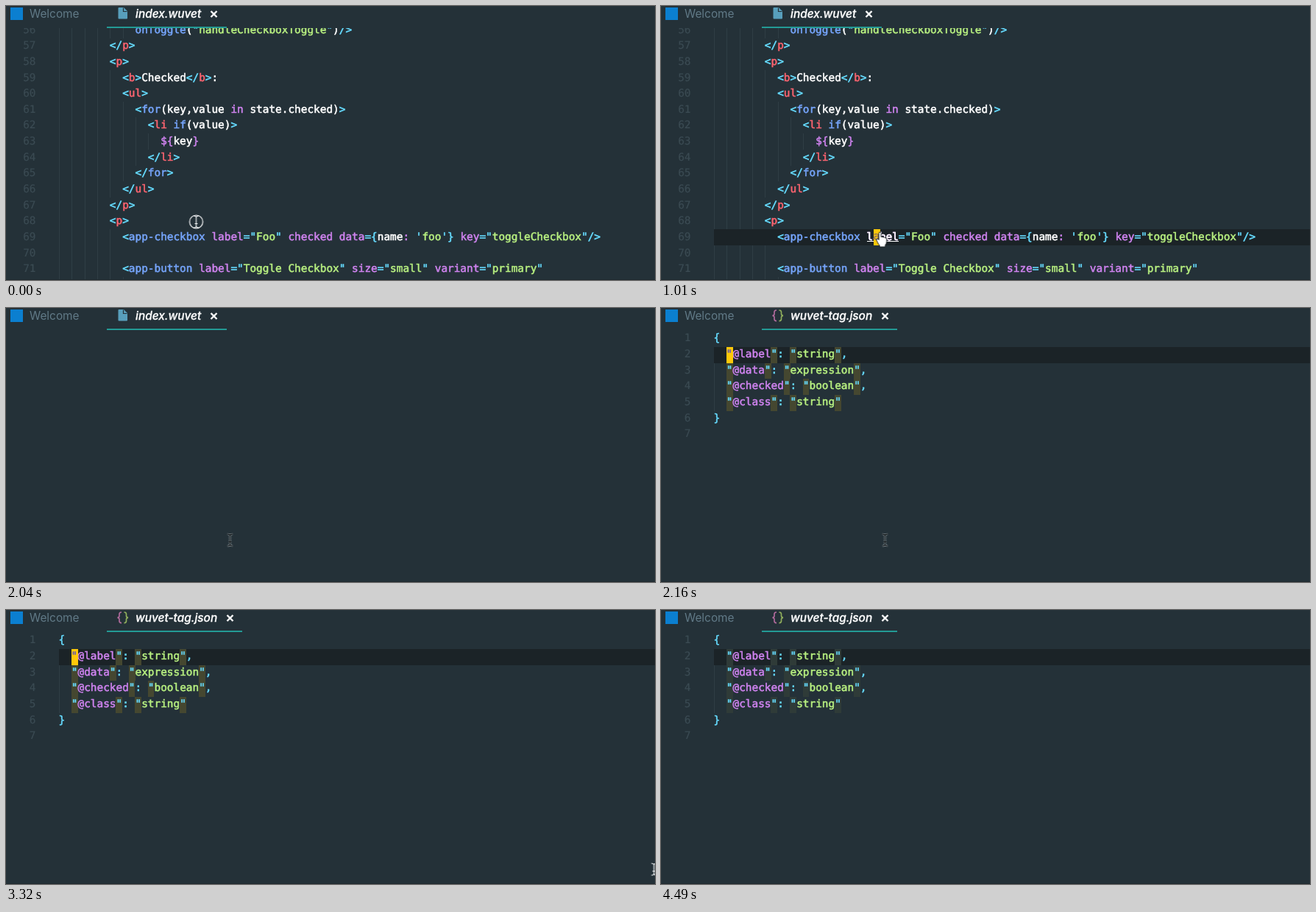
Animation of 882x372 px, one loop 4590 ms. Source, as an HTML page:

```html
<!DOCTYPE html>
<html lang="en">
<head>
<meta charset="utf-8">
<title>Editor</title>
<style>
  html, body { margin: 0; width: 100%; height: 100%; overflow: hidden; background: #243138; }
  #stage { position: relative; width: 882px; height: 372px; overflow: hidden; background: #243138; }
  #stage * { box-sizing: border-box; }
  .abs, .tab, .row, .row > *, .editor { position: absolute; }

  /* tabs */
  .tab { top: 0; left: 137px; height: 30px; border-bottom: 2px solid #239a95; }
  .name { position: absolute; top: 0; white-space: pre;
    font: 500 15.4px/21px Inter, "Open Sans", sans-serif; color: #fff; }
  .tab .name { left: 39px; font-style: italic; -webkit-text-stroke: .3px; }
  .tab svg { position: absolute; left: 0; top: 0; overflow: visible; }

  /* code */
  .editor { left: 0; top: 30px; width: 882px; height: 342px; overflow: hidden; }
  .row { left: 0; width: 882px; height: 21.65px; }
  .row, .tip { font: 14.4px/21.65px "DejaVu Sans Mono", monospace; white-space: pre;
    text-rendering: geometricPrecision; -webkit-text-stroke: .55px; }
  .num, .text, .link { top: var(--drop); }
  #doc { --drop: 1px; }
  #json { --drop: 0px; }
  .num { left: 0; width: 40.5px; text-align: right; color: #3b4b53; -webkit-text-stroke: .2px; }
  .text { left: 71.5px; }
  .guide { top: 0; left: 71.5px; height: 22px;
    background: repeating-linear-gradient(90deg, #2f3e45 0 1px, transparent 1px 17.338px); }
  .line { left: 72px; right: 0; height: 22px; background: #1b2327; }
  .block { width: 9px; height: 21.5px; background: #ffc809; color: #6a5fa8; }
  .link { left: 279.6px; color: #fff; }
  .link::after { content: ""; position: absolute; left: 0; right: 0; top: 15px; height: 1px; background: #fff; }
  .c { color: #66dcff; } .b { color: #76a5fb; } .r { color: #fc6470; }
  .p { color: #cf83ef; } .g { color: #b8f080; } .w { color: #fff; }
  .q { display: inline-block; color: #66dcff; }
  .tip { left: 279px; top: 222px; width: 205px; height: 54px; padding: 5px 0 0 7px;
    background: #223036; border: 1px solid #35444b; }

  /* timing */
  .doc { animation: doc 4.59s step-end infinite; }
  .json { animation: json 4.59s step-end infinite; }
  .tab1 { animation: tab1 4.59s step-end infinite; }
  .picked { animation: picked 4.59s step-end infinite; }
  .link, .hand { animation: link 4.59s step-end infinite; }
  .tip { animation: tip 4.59s linear infinite; }
  .blink { animation: blink 4.59s step-end infinite; }
  .q { animation: quotes 4.59s step-end infinite; }
  #pointer { animation: move 4.59s linear infinite; }
  .beam { animation: beam 4.59s step-end infinite; }
  .dark { animation: dark 4.59s step-end infinite; }
  .ring { animation: ring 4.59s linear infinite; }

  @keyframes doc { 0% { opacity: 1 } 43.79%, 100% { opacity: 0 } }
  @keyframes tab1 { 0% { opacity: 1 } 45.75%, 100% { opacity: 0 } }
  @keyframes json { 0% { opacity: 0 } 45.75%, 100% { opacity: 1 } }
  @keyframes picked { 0% { opacity: 0 } 22%, 100% { opacity: 1 } }
  @keyframes link { 0% { opacity: 0 } 14.37% { opacity: 1 } 40.52%, 100% { opacity: 0 } }
  @keyframes tip { 0%, 28.3% { opacity: 0 } 30.9%, 39.5% { opacity: 1 } 40.52%, 100% { opacity: 0 } }
  @keyframes blink {
    0% { opacity: 1 } 53.59% { opacity: 0 } 59.69% { opacity: 1 } 64.48% { opacity: 0 }
    70.15% { opacity: 1 } 76.25% { opacity: 0 } 90.41% { opacity: 1 } 97.82%, 100% { opacity: 0 }
  }
  @keyframes quotes { 0% { background: #454730 } 97.82%, 100% { background: #2f3b38 } }
  @keyframes beam { 0% { opacity: 1 } 14.37% { opacity: 0 } 52.94%, 100% { opacity: 1 } }
  @keyframes dark { 0% { opacity: 0 } 40.52% { opacity: 1 } 52.94%, 100% { opacity: 0 } }
  @keyframes ring { 0%, .65% { opacity: 1 } 3.2%, 100% { opacity: 0 } }
  @keyframes move {
    0%, .5% { transform: translate(258.5px, 293px) }
    3.27% { transform: translate(277px, 304px) }
    6.1% { transform: translate(291px, 315px) }
    8.06%, 11% { transform: translate(296px, 309.5px) }
    11.11%, 22% { transform: translate(296.5px, 310px) }
    26% { transform: translate(298px, 314px) }
    30.9%, 33.3% { transform: translate(294px, 310.5px) }
    35.9%, 52.5% { transform: translate(304.5px, 315px) }
    60.13% { transform: translate(245px, 255px) }
    63.83%, 64.2% { transform: translate(243px, 250px) }
    67.53% { transform: translate(500px, 235px) }
    70.15% { transform: translate(810px, 255px) }
    71.46% { transform: translate(850px, 310px) }
    72.33% { transform: translate(880.5px, 352px) }
    75.38% { transform: translate(881px, 354px) }
    79.3%, 100% { transform: translate(894px, 386px) }
  }
</style>
</head>
<body>
<div id="stage">
  <div class="abs" style="left:6px;top:2px;width:17px;height:17px;background:#0b7fd0"></div>
  <div class="name" style="left:32px;color:#617a87;font-weight:400">Welcome</div>

  <div class="tab tab1" style="width:163px">
    <svg width="163" height="30">
      <path d="M16.500 2h6.500l5 5v9.500q0 1-1 1h-10.500q-1 0-1-1v-13.500q0-1 1-1z" fill="#589fbc"/>
      <path d="M22.500 2.500v5h5" fill="none" stroke="#243138" stroke-width="1.200"/>
      <path d="M141.500 7l8 8m0-8l-8 8" stroke="#fff" stroke-width="2.400"/>
    </svg>
    <div class="name">index.wuvet</div>
  </div>

  <div class="tab json" style="width:184px">
    <svg width="184" height="30" fill="none" stroke-width="1.700">
      <path d="M20 3q-3 0-3 2.500v2.500q0 2-2.500 2.300q2.500.3 2.500 2.300v2.500q0 2.500 3 2.500" stroke="#b06a9c"/>
      <path d="M23.500 3q3 0 3 2.500v2.500q0 2 2.500 2.300q-2.500.3-2.500 2.300v2.500q0 2.500-3 2.500" stroke="#8fae5c"/>
      <path d="M163.500 7l8 8m0-8l-8 8" stroke="#fff" stroke-width="2.400"/>
    </svg>
    <div class="name">wuvet-tag.json</div>
  </div>

  <div class="editor doc" id="doc"></div>
  <div class="editor json" id="json"></div>
  <div class="abs" style="left:0;top:371px;width:882px;height:1px;background:#1e292e"></div>

  <svg class="abs" style="left:0;top:0" width="882" height="372" fill="none">
    <defs>
      <path id="ibeam" d="M-3.500-8q3.500 0 3.500 2.500q0-2.500 3.500-2.500M-3.500 8q3.500 0 3.500-2.500q0 2.500 3.500 2.500M0-6v12M-2 2.500h4"/>
    </defs>
    <g id="pointer">
      <circle class="ring" r="9" stroke="#fff" stroke-width="1.200"/>
      <use class="beam" href="#ibeam" stroke="#f2f5f6" stroke-width="1.200"/>
      <g class="dark">
        <use href="#ibeam" stroke="#98a2a7" stroke-width="2.600"/>
        <use href="#ibeam" stroke="#12181b" stroke-width="1.300"/>
      </g>
      <path class="hand" fill="#fff" stroke="#11181b" stroke-width="1"
        d="M-.500-1.500q0-1.500 1.500-1.500t1.500 1.500v5q1.500-1 2.700.4q1.600-.7 2.500.7q2.500-.4 2.500 2v3q0 3-2 5v2.400h-7.700v-2q-1.500-1.500-2.800-4.200l-1.200-2.500q-.7-1.800.7-2.200t2.300 1.400z"/>
    </g>
  </svg>
</div>

<script>
  const PITCH = 21.65, CLIP = 30;

  // "~x" starts a run of text in colour class x
  const paint = s => s.split('~').map((run, i) => i
    ? `<span class="${run[0]}">${run.slice(1).replace(/</g, '&lt;')}</span>` : run).join('');

  const row = (num, y, indent, code, under = '', over = '') =>
    `<div class="row" style="top:${y - CLIP}px">` +
    `<i class="guide" style="width:${indent * 8.669}px"></i>${under}` +
    `<span class="num">${num}</span>` +
    `<span class="text">${code && ' '.repeat(indent) + paint(code)}</span>${over}</div>`;

  const block = (x, ch, cls, color = '') =>
    `<span class="block ${cls}" style="left:${x}px;${color}">${ch}</span>`;

  const open = (tag, c = 'r') => `~c<~${c}${tag}~c>`;
  const close = (tag, c = 'r') => `~c</~${c}${tag}~c>`;
  const attr = (key, value) => ` ~p${key}~c="~g${value}~c"`;

  const code = [
    [12, '~bonToggle~w(~c"~ghandleCheckboxToggle~c"~w)~c/>'],
    [8, close('p')],
    [8, open('p')],
    [10, open('b') + '~wChecked' + close('b') + '~w:'],
    [10, open('ul')],
    [12, '~c<~bfor~w(key,value ~pin~w state.checked)~c>'],
    [14, '~c<~rli ~bif~w(value)~c>'],
    [16, '~p${~wkey~p}'],
    [14, close('li')],
    [12, close('for', 'b')],
    [10, close('ul')],
    [8, close('p')],
    [8, open('p')],
    [10, '~c<~bapp-checkbox' + attr('label', 'Foo') + ' ~pchecked data~c={~wname~p: ~c\'~gfoo~c\'~c}' +
      attr('key', 'toggleCheckbox') + '/>'],
    [10, ''],
    [10, '~c<~bapp-button' + attr('label', 'Toggle Checkbox') + attr('size', 'small') + attr('variant', 'primary')],
    [12, '~bonClick~w(~c"~ghandleToggleCheckboxButtonClick~c"~w)']
  ];

  const tipLine = (key, type) => paint(`~c"~g@${key}~c"~w: ~c"~g${type}~c"~w,`);

  document.getElementById('doc').innerHTML = code.map(([indent, text], i) => {
    const num = 56 + i, y = 303 + (num - 69) * PITCH;
    return num === 69
      ? row(num, y, indent, text, '<i class="line picked"></i>',
        '<span class="link">label</span>' + block(288.500, 'a', 'picked', 'color:#9a7a50'))
      : row(num, y, indent, text);
  }).join('') +
    `<div class="abs tip">${tipLine('label', 'string')}\n${tipLine('data', 'expression')}</div>`;

  const pair = (key, type, end = ',') => [2, `~q"~p@${key}~q"~c: ~q"~g${type}~q"~c${end}`];
  const tag = [
    [0, '~c{'],
    pair('label', 'string'),
    pair('data', 'expression'),
    pair('checked', 'boolean'),
    pair('class', 'string', ''),
    [0, '~c}'],
    [0, '']
  ];

  document.getElementById('json').innerHTML = tag.map(([indent, text], i) => {
    const y = 53 + (i - 1) * PITCH;
    return i === 1
      ? row(2, y, indent, text, '<i class="line"></i>', block(88.500, '"', 'blink'))
      : row(i + 1, y, indent, text);
  }).join('');
</script>
</body>
</html>
```
